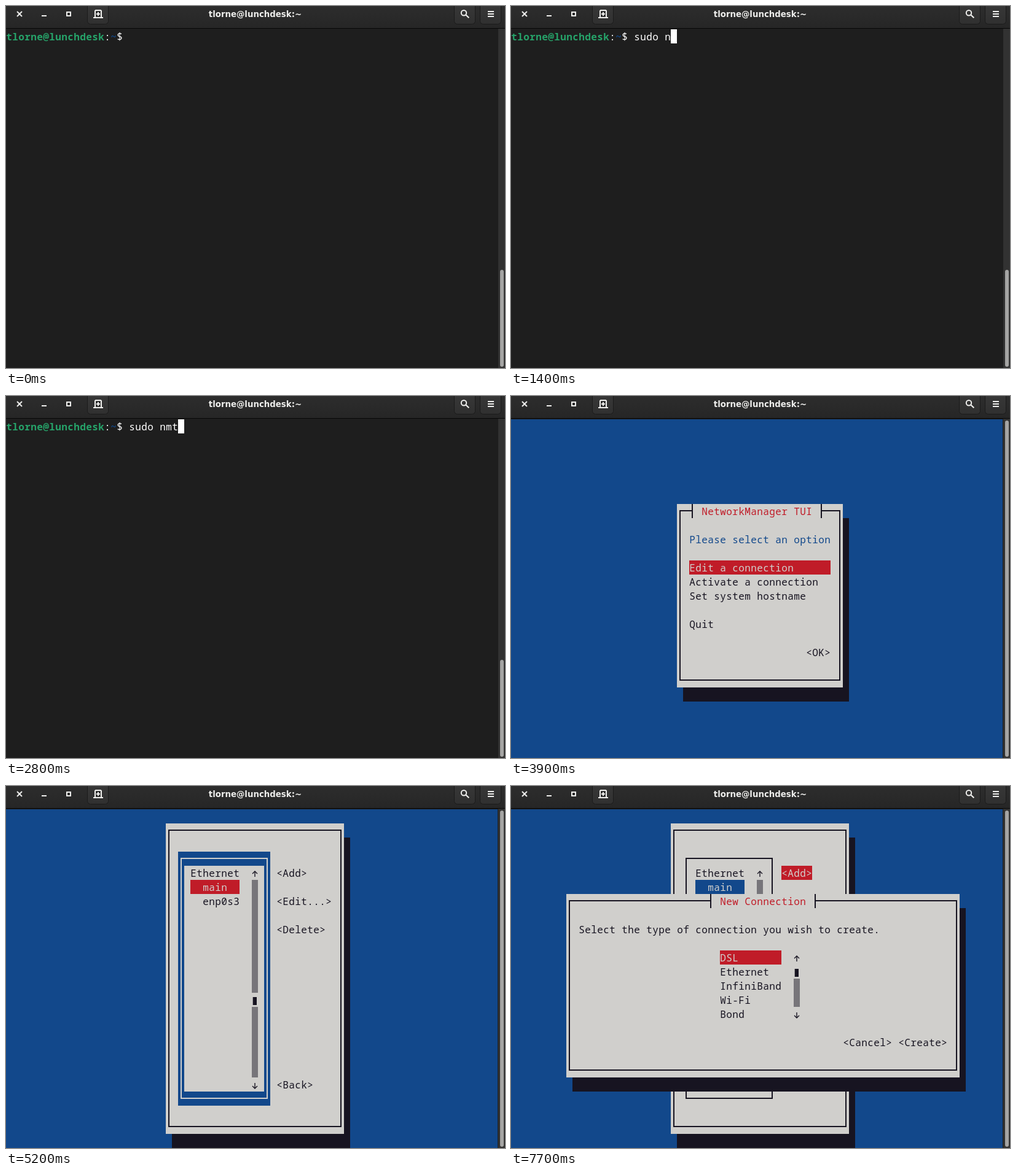
An HTML page with a canvas that plays this animation: 812 px wide and 590 px high, repeating every 8000 ms.

```html
<!DOCTYPE html>
<html lang="en">
<head>
<meta charset="utf-8">
<title>Terminal</title>
<style>
  html, body { margin: 0; width: 100%; height: 100%; overflow: hidden; background: #1e1e1e; }
  canvas { display: block; }
</style>
</head>
<body>
<canvas id="stage" width="812" height="590"></canvas>
<script>
const ctx = document.getElementById('stage').getContext('2d');
const LOOP = 8000, CELL_W = 10, CELL_H = 23, TOP = 38;
const USER = 'tlorne@lunchdesk';
const BLUE = '#12488b', PAPER = '#d0cfcc', INK = '#171421', RED = '#c01c28';
const TRACK = '#77757a', GREEN = '#26a269', ICON = '#eeeeec';

// [time, typed command]; the third entry shortens one mistyped letter
const typing = [
  [300, 's'], [700, 'su'], [800, 'sud'], [900, 'sudo'], [1000, 'sudo '],
  [1400, 'sudo n'], [1500, 'sudo nm'], [1800, 'sudo nmu'], [2300, 'sudo nm'],
  [2800, 'sudo nmt'], [3000, 'sudo nmtu'], [3300, 'sudo nmtui']
];

const rowY = row => TOP + row * CELL_H;

function rect(x, y, w, h, color) {
  ctx.fillStyle = color;
  ctx.fillRect(x, y, w, h);
}

function cells(col, row, cols, rows, color) {
  rect(col * CELL_W, rowY(row), cols * CELL_W, rows * CELL_H, color);
}

function text(col, row, string, color = INK, weight = 400) {
  ctx.font = `${weight} 16px "Noto Sans Mono", monospace`;
  ctx.textAlign = 'center';
  ctx.fillStyle = color;
  [...string].forEach((char, i) =>
    ctx.fillText(char, (col + i + 0.5) * CELL_W, rowY(row) + 18));
}

function highlight(col, row, cols, string, back = RED) {
  cells(col, row, cols, 1, back);
  text(col, row, string, PAPER);
}

function line(points, width, color, closed) {
  ctx.beginPath();
  points.forEach(([x, y]) => ctx.lineTo(x, y));
  if (closed) ctx.closePath();
  ctx.lineWidth = width;
  ctx.strokeStyle = color;
  ctx.stroke();
}

function border(col, row, cols, rows, color = INK) {
  ctx.lineWidth = 2;
  ctx.strokeStyle = color;
  ctx.strokeRect(col * CELL_W + 5, rowY(row) + 11, (cols - 1) * CELL_W, (rows - 1) * CELL_H);
}

function dialog(col, row, cols, rows, title, titleCol) {
  cells(col + 1, row + 1, cols, rows, INK);
  cells(col, row, cols, rows, PAPER);
  border(col, row, cols, rows);
  if (!title) return;
  const left = titleCol - 2, right = titleCol + title.length + 1;
  rect(left * CELL_W + 6, rowY(row), (right - left) * CELL_W - 2, CELL_H, PAPER);
  for (const c of [left, right]) rect(c * CELL_W + 4, rowY(row), 2, CELL_H, INK);
  text(titleCol, row, title, RED);
}

function arrow(col, row, dir) {
  const x = col * CELL_W + 5, y = rowY(row) + 13.5, tip = y + dir * 4.5;
  line([[x, y - dir * 4.5], [x, tip]], 1.4, INK);
  line([[x - 4, tip - dir * 4], [x, tip], [x + 4, tip - dir * 4]], 1.4, INK);
}

function scrollbar(col, first, last, thumb) {
  arrow(col, first, -1);
  cells(col, first + 1, 1, last - first - 1, TRACK);
  cells(col, thumb, 1, 1, PAPER);
  rect(col * CELL_W + 1.7, rowY(thumb) + 7, 6.3, 13, INK);
  arrow(col, last, 1);
}

function button(x) {
  ctx.beginPath();
  ctx.roundRect(x + 0.5, -8, 34, 37.5, 5);
  const shade = ctx.createLinearGradient(0, 0, 0, 29);
  shade.addColorStop(0, '#373737');
  shade.addColorStop(1, '#303030');
  ctx.fillStyle = shade;
  ctx.fill();
  ctx.lineWidth = 1;
  ctx.strokeStyle = '#1b1b1b';
  ctx.stroke();
}

function header() {
  const shade = ctx.createLinearGradient(0, 0, 0, 36);
  shade.addColorStop(0, '#2d2d2d');
  shade.addColorStop(1, '#262626');
  rect(0, 0, 812, 36, shade);
  rect(0, 36, 812, 1, '#070707');
  [132, 729, 771].forEach(button);

  line([[18, 9], [26, 17]], 2, ICON);
  line([[26, 9], [18, 17]], 2, ICON);
  rect(58, 15, 8, 2, ICON);
  line([[99, 10], [105, 10], [105, 16], [99, 16]], 2, ICON, true);

  line([[145, 19], [145, 8], [146, 7], [154, 7], [155, 8], [155, 19]], 2, ICON);
  rect(142, 18, 16, 2, ICON);
  rect(147, 12, 6, 2, ICON);
  rect(149, 10, 2, 6, ICON);

  ctx.beginPath();
  ctx.arc(745, 11.3, 4.2, 0, 7);
  ctx.stroke();
  line([[748, 14.3], [753.3, 19.3]], 2.2, ICON);
  for (const y of [8, 12, 16]) rect(784, y, 10, 2, ICON);

  ctx.font = 'bold 13.33px "DejaVu Sans", sans-serif';
  ctx.textAlign = 'center';
  ctx.fillStyle = ICON;
  ctx.fillText(USER + ':~', 405.5, 18);
}

function windowScrollbar(x, thumbTop) {
  rect(x, 37, 812 - x, 553, '#323232');
  ctx.beginPath();
  ctx.roundRect(804, thumbTop, 6, 588 - thumbTop, 3);
  ctx.fillStyle = '#a4a4a3';
  ctx.fill();
}

function shell(t) {
  text(0, 0, USER, GREEN, 700);
  text(16, 0, ':', '#fff');
  text(17, 0, '~', BLUE, 700);
  text(18, 0, '$', '#fff');
  const step = typing.filter(([start]) => start <= t).pop();
  if (!step) return;
  text(20, 0, step[1], '#fff');
  if (t < 3800) cells(20 + step[1].length, 0, 1, 1, '#fff');
}

function mainMenu() {
  dialog(27, 6, 27, 13, 'NetworkManager TUI', 31);
  text(29, 8, 'Please select an option', BLUE);
  highlight(29, 10, 23, 'Edit a connection');
  text(29, 11, 'Activate a connection');
  text(29, 12, 'Set system hostname');
  text(29, 14, 'Quit');
  text(48, 16, '<OK>');
}

function connections(listFocused) {
  dialog(26, 1, 29, 22);
  if (listFocused) cells(28, 3, 15, 18, BLUE);
  border(28, 3, 15, 18, listFocused ? PAPER : INK);
  cells(29, 4, 13, 16, PAPER);
  text(30, 4, 'Ethernet');
  highlight(30, 5, 8, '  main', listFocused ? RED : BLUE);
  text(32, 6, 'enp0s3');
  scrollbar(40, 4, 19, 13);
  if (listFocused) text(44, 4, '<Add>');
  else highlight(44, 4, 5, '<Add>');
  text(44, 6, '<Edit...>');
  text(44, 8, '<Delete>');
  text(44, 19, '<Back>');
}

function newConnection() {
  dialog(9, 6, 64, 13, 'New Connection', 34);
  text(11, 8, 'Select the type of connection you wish to create.');
  highlight(34, 10, 10, 'DSL');
  ['Ethernet', 'InfiniBand', 'Wi-Fi', 'Bond'].forEach((name, i) => text(34, 11 + i, name));
  scrollbar(46, 10, 14, 11);
  text(54, 16, '<Cancel>');
  text(63, 16, '<Create>');
}

function draw(t) {
  const inMenu = t >= 3900;
  rect(0, 0, 812, 590, '#1e1e1e');
  if (inMenu) {
    cells(0, 0, 80, 24, BLUE);
    if (t < 5200) mainMenu();
    else connections(t < 6900);
    if (t >= 7700) newConnection();
  } else {
    shell(t);
  }
  windowScrollbar(801, inMenu ? 40 : 430);
  header();
}

function tick() {
  draw(performance.now() % LOOP);
  requestAnimationFrame(tick);
}
tick();
</script>
</body>
</html>
```
